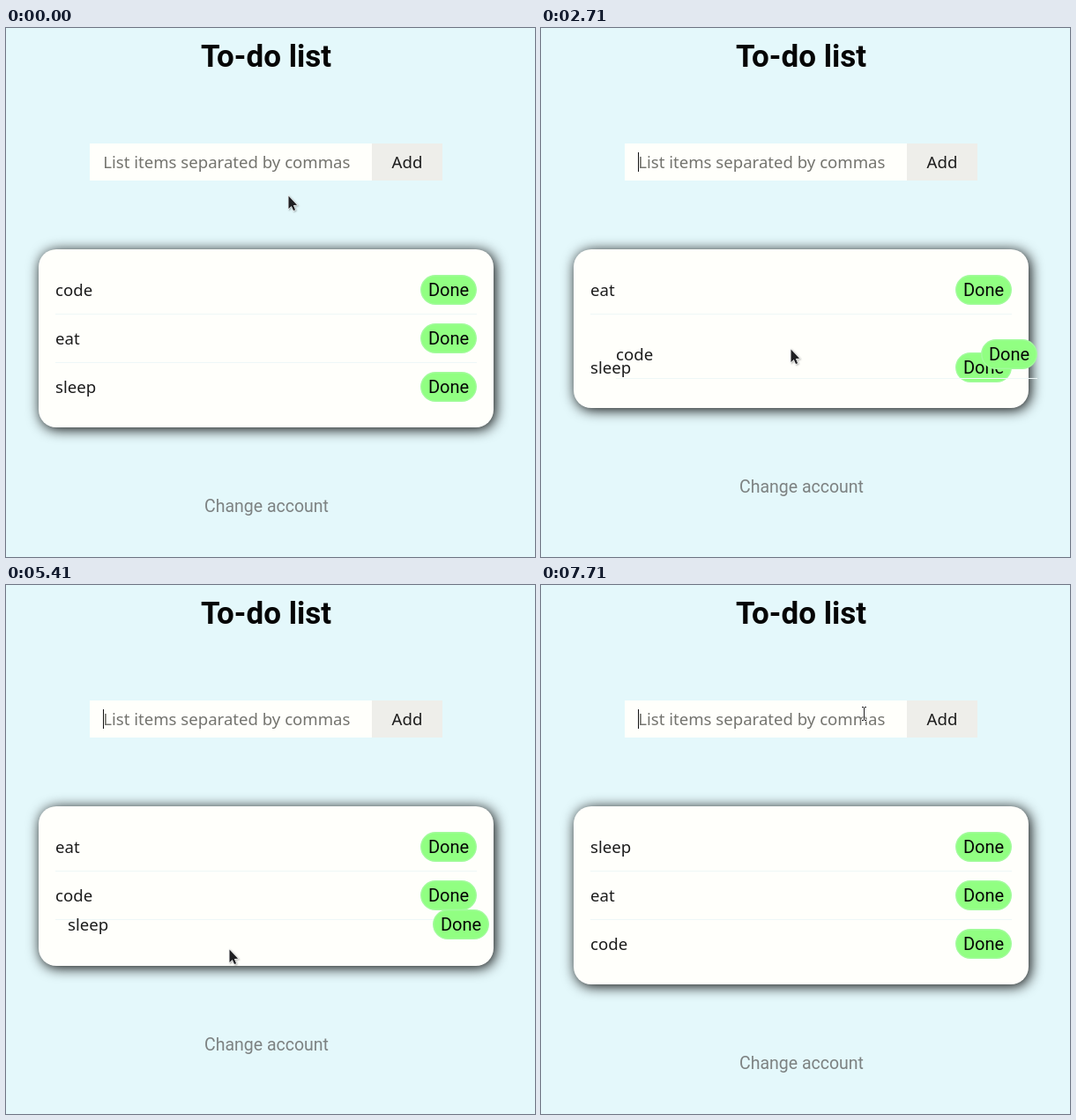
An HTML page with a canvas that plays this animation: 600 px wide and 600 px high, repeating every 8 s.

```html
<!DOCTYPE html>
<html lang="en">
<head>
<meta charset="utf-8">
<title>To-do list</title>
<style>
html, body { margin: 0; width: 100%; height: 100%; overflow: hidden; background: #e4f8fb; }
canvas { display: block; }
</style>
</head>
<body>
<canvas id="stage" width="600" height="600"></canvas>
<script>
const ctx = document.getElementById('stage').getContext('2d');
const LOOP = 8000, ROW = 55, GAP = 33, TOP = 270, LEFT = 56;
const LEAD = 50; // the dragged row runs this many ms ahead of the pointer
const UI = '18.6px "Noto Sans", "Open Sans", sans-serif';
const ROBOTO = 'Roboto, Arial, sans-serif';

// Pointer moves: end point, sideways bow, and ease-out strength
const START = { x: 320, y: 190 };
const moves = [
  { from: 840, to: 1770, x: 250, y: 295, bow: 0, ease: 1.3 },
  { from: 2010, to: 2880, x: 273, y: 389, bow: 29, ease: 0.8 },
  { from: 3240, to: 3740, x: 271, y: 341, bow: 0, ease: 1.3 },
  { from: 4680, to: 5010, x: 250, y: 417, bow: 0, ease: 1 },
  { from: 5400, to: 6070, x: 250, y: 291, bow: 51, ease: 2 },
  { from: 6700, to: 6940, x: 304, y: 220, bow: 0, ease: 1 },
  { from: 7420, to: 7710, x: 366, y: 146, bow: 0, ease: 1 }
];

// swaps: when the gap moves, and to which place
const drags = [
  { from: 2040, to: 4110, item: 'code', rest: ['eat', 'sleep'], home: 0,
    grab: { x: 251, y: 297 }, swaps: [[2040, 0], [2450, 1], [2870, 2], [3480, 1]] },
  { from: 5410, to: 6510, item: 'sleep', rest: ['eat', 'code'], home: 2,
    grab: { x: 250, y: 417 }, swaps: [[5410, 2], [5620, 1], [6000, 0]] }
];

function pointerAt(t) {
  let at = START;
  for (const m of moves) {
    if (t < m.from) break;
    const p = Math.min(1, (t - m.from) / (m.to - m.from));
    const s = 1 - (1 - p) ** m.ease;
    at = {
      x: at.x + (m.x - at.x) * s + m.bow * Math.sin(Math.PI * p),
      y: at.y + (m.y - at.y) * s
    };
  }
  return at;
}

function text(str, x, y, font, color, align = 'left') {
  ctx.font = font;
  ctx.fillStyle = color;
  ctx.textAlign = align;
  ctx.fillText(str, x, y);
}

function rect(x, y, w, h, color) {
  ctx.fillStyle = color;
  ctx.fillRect(x, y, w, h);
}

function rounded(x, y, w, h, r, color) {
  ctx.beginPath();
  ctx.roundRect(x, y, w, h, r);
  ctx.fillStyle = color;
  ctx.fill();
}

function drawRow(label, x, y, line) {
  x = Math.round(x);
  y = Math.round(y);
  text(label, x + 0.1, y + 34, UI, '#1c1c1c');
  rounded(x + 414, y + 10, 64, 34, 17, '#a2fb9c');
  rounded(x + 415.5, y + 11.5, 61, 31, 15.5, '#91ff82');
  text('Done', x + 446, y + 34, '20px ' + ROBOTO, '#050505', 'center');
  if (line) rect(x, y + 54, 478, 1, '#eef7f7');
}

function drawCard(h) {
  ctx.save();
  ctx.shadowColor = '#000';
  ctx.shadowBlur = 15;
  ctx.shadowOffsetX = ctx.shadowOffsetY = 2;
  rounded(37, 251, 516, h, 20, '#fffffb');
  ctx.restore();
  text('Change account', 295.5, 347 + h, '19.5px ' + ROBOTO, '#7d8282', 'center');
}

function drawList(t) {
  const drag = drags.find(d => t >= d.from && t < d.to);
  if (!drag) {
    const order = t < 2040 ? ['code', 'eat', 'sleep']
      : t < 5410 ? ['eat', 'code', 'sleep'] : ['sleep', 'eat', 'code'];
    drawCard(202);
    order.forEach((label, i) => drawRow(label, LEFT, TOP + i * ROW, i < 2));
    return;
  }
  const slot = drag.swaps.filter(s => s[0] <= t).pop()[1];
  const fromTop = drag.home === 0;
  drawCard(181 - (fromTop ? (slot === 2 ? 2 : 1) : 0));
  drag.rest.forEach((label, i) => {
    const y = TOP + i * ROW + (i >= slot ? GAP : 0);
    drawRow(label, LEFT, y, i === 0 || slot === 2 || !fromTop);
  });
  const hand = pointerAt(t + LEAD);
  const x = LEFT + hand.x - drag.grab.x;
  const y = TOP + drag.home * ROW + hand.y - drag.grab.y;
  drawRow(drag.item, x, y, fromTop);
}

function drawForm(t) {
  rect(95, 131, 320, 42, '#fffffb');
  rect(415, 131, 80, 42, '#eeeeea');
  text('List items separated by commas', 110.2, 159, UI, '#74746f');
  text('Add', 455, 159, UI, '#1c1c1c', 'center');
  const blink = (t >= 4710 && t < 5410) || (t >= 7110 && t < 7710);
  if (t >= 2040 && !blink) rect(110, 141, 1, 22, '#111');
}

function drawArrow(x, y) {
  ctx.save();
  ctx.translate(x + 0.5, y + 0.5);
  ctx.beginPath();
  [[0, 0], [0, 14.5], [3.3, 11.4], [5.5, 16.6], [7.6, 15.7], [5.4, 10.6], [9.6, 10.2]]
    .forEach(p => ctx.lineTo(...p));
  ctx.closePath();
  ctx.shadowColor = 'rgba(0,0,0,.35)';
  ctx.shadowBlur = 2;
  ctx.shadowOffsetX = ctx.shadowOffsetY = 1;
  ctx.lineWidth = 1.2;
  ctx.strokeStyle = '#f4f6f6';
  ctx.stroke();
  ctx.shadowColor = 'transparent';
  ctx.fillStyle = '#1f1f22';
  ctx.fill();
  ctx.restore();
}

function drawBeam(x, y) {
  const shape = (grow, color) => {
    const bar = (a, b, w, h) =>
      rect(x + a - grow, y + b - grow, w + 2 * grow, h + 2 * grow, color);
    bar(0, -7, 1, 14);
    for (const b of [-8, 7]) {
      bar(-2, b, 2, 1);
      bar(1, b, 2, 1);
    }
  };
  shape(1, 'rgba(255,255,255,.6)');
  shape(0, '#222');
}

function draw(t) {
  rect(0, 0, 600, 600, '#e4f8fb');
  text('To-do list', 295, 44, 'bold 35px ' + ROBOTO, '#050505', 'center');
  drawForm(t);
  drawList(t);
  const at = pointerAt(t), x = Math.round(at.x), y = Math.round(at.y);
  const inField = x > 95 && x < 415 && y > 131 && y < 173;
  (inField ? drawBeam : drawArrow)(x, y);
}

const began = performance.now();
function tick() {
  draw((performance.now() - began) % LOOP);
  requestAnimationFrame(tick);
}
tick();
</script>
</body>
</html>
```
